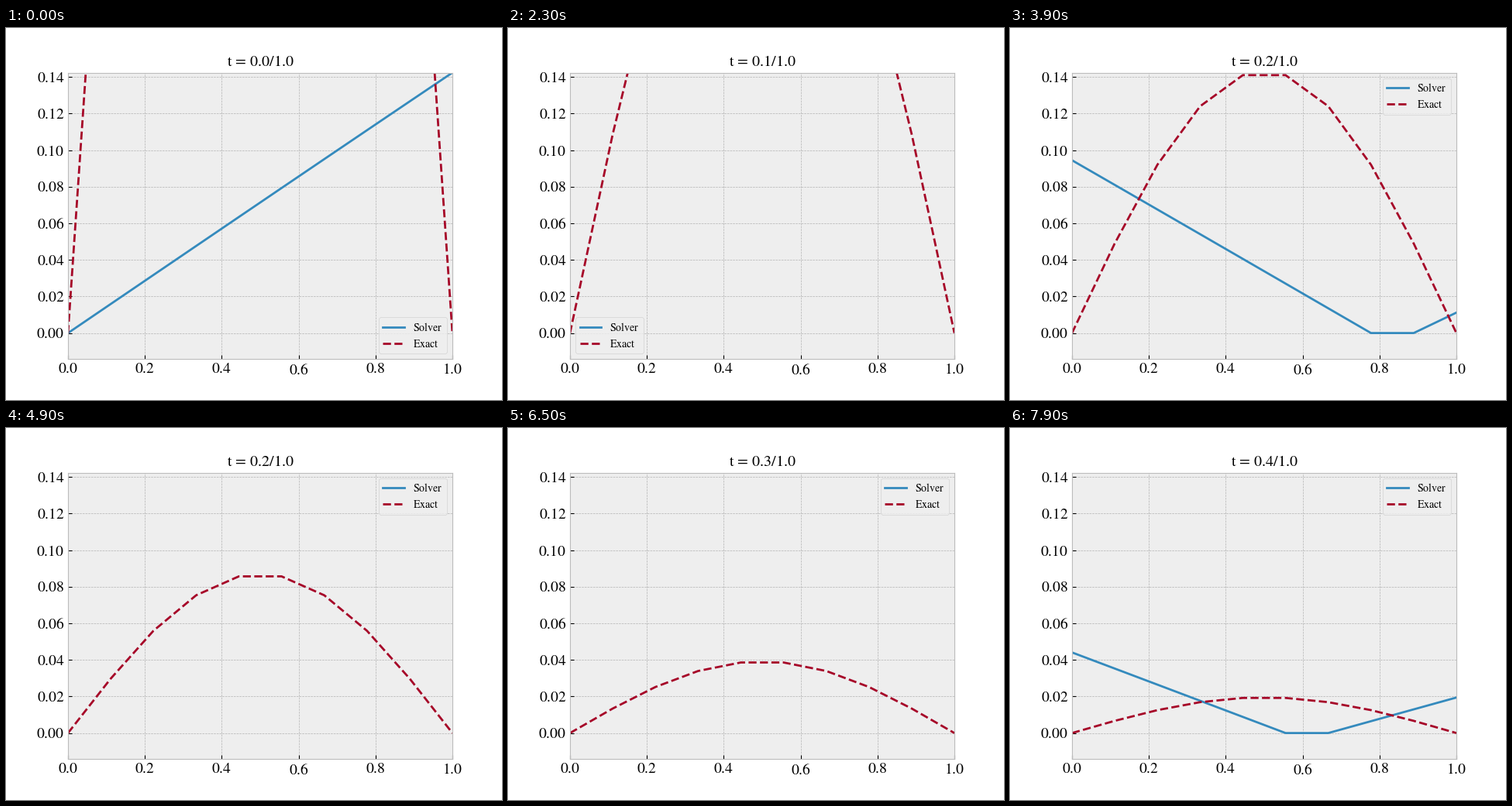
Write a matplotlib script that moves like this. It is 640 px wide and 480 px high and loops after 8 s.

```python
import numpy as np
import matplotlib.pyplot as plt
from matplotlib.animation import FuncAnimation

plt.style.use("bmh")
plt.rcParams.update({
    "font.family": "Liberation Serif",
    "mathtext.fontset": "stix",
    "xtick.labelsize": 14,
    "ytick.labelsize": 14,
})

FRAMES, INTERVAL = 80, 100
NX, NT = 10, 199
DECAY = 0.015 * np.pi ** 2

x = np.linspace(0, 1, NX)
times = np.linspace(0, 1, NT)

# The solver's long rows are cut into strips of NX values, one per frame.
amps = 1 - DECAY * np.arange(NX)
strips = np.outer(amps, np.sin(np.pi * times)).reshape(NT, NX)
top = strips[0].max()


def roman(text):
    return rf"$\mathrm{{{text}}}$"


def exact(t):
    return np.exp(-np.pi ** 2 * t) * np.sin(np.pi * x)


fig, ax = plt.subplots(figsize=(6.4, 4.8), dpi=100)
solver_line, = ax.plot(x, strips[0], label=roman("Solver"))
exact_line, = ax.plot(x, exact(0), "--", label=roman("Exact"))
ax.set_xlim(0, 1)
ax.set_ylim(-0.1 * top, top)
ax.xaxis.set_major_formatter(lambda v, pos: roman(f"{v:.1f}"))
ax.yaxis.set_major_formatter(lambda v, pos: roman(f"{abs(v):.2f}"))
ax.legend(loc="best")
title = ax.set_title("")


def update(k):
    t = times[k]
    solver_line.set_ydata(strips[k])
    exact_line.set_ydata(exact(t))
    title.set_text(roman(rf"t\,=\,{t:.1f}/1.0"))
    return solver_line, exact_line, title


anim = FuncAnimation(fig, update, frames=FRAMES, interval=INTERVAL,
                     repeat=True, repeat_delay=0, blit=False)
plt.show()
```
